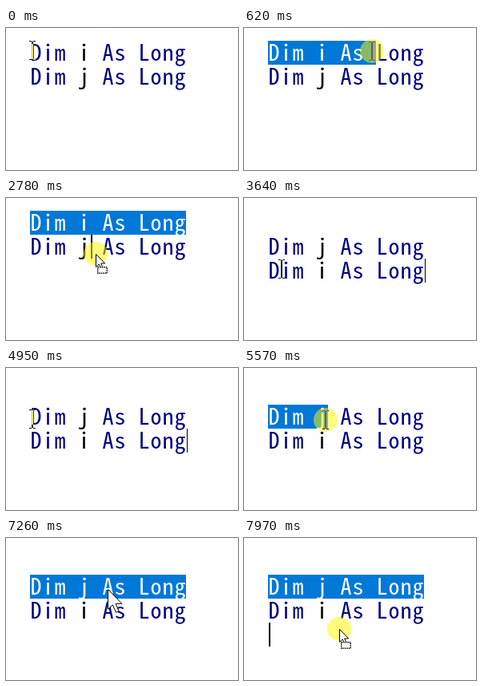
Animation, 290 px wide and 178 px high, one loop 8 s. Source, as an HTML page with a canvas:

```html
<!DOCTYPE html>
<html lang="en">
<head>
<meta charset="utf-8">
<title>Moving a line by drag and drop</title>
<style>
html, body { margin: 0; width: 100%; height: 100%; overflow: hidden; background: #fff; }
canvas { display: block; }
</style>
</head>
<body>
<canvas id="stage" width="290" height="178"></canvas>
<script>
const ctx = document.getElementById('stage').getContext('2d');
const LOOP = 8000, FRAME = 77, DROP = 3640;
const LEFT = 30, TOP = 16, CELL = 15, ROW = 30, LENGTH = 13;
const FONT = '28px "Noto Sans Mono CJK JP", "Noto Sans CJK JP", "Noto Sans CJK", monospace';

const linear = p => p;
const easeIn = power => p => p ** power;
const easeOut = power => p => 1 - (1 - p) ** power;

// Each move starts where the previous one ended.
const moves = [
  { start: 0, end: 0, mode: 'rest', x: 33, y: 28 },
  { start: 230, end: 1240, mode: 'select', x: 222, y: 31, easeX: easeOut(2.3) },
  { start: 1550, end: 2090, mode: 'hover', x: 118, y: 32, easeX: easeOut(2.3) },
  { start: 2470, end: 3160, mode: 'drag', x: 47, y: 89, easeX: easeIn(3), easeY: easeOut(1.9) },
  { start: DROP, end: DROP, mode: 'rest', x: 47, y: 89 },
  { start: 4570, end: 4950, mode: 'rest', x: 33, y: 64 },
  { start: 5350, end: 6630, mode: 'select', x: 225, y: 68, easeX: easeOut(2.3), easeY: easeOut(2.3) },
  { start: 6950, end: 7410, mode: 'hover', x: 119, y: 58, easeX: easeOut(2.3), easeY: easeIn(2) },
  { start: 7580, end: 7970, mode: 'drag', x: 119, y: 114 },
];

const rowTop = row => TOP + row * ROW;
const columnAt = x => Math.max(0, Math.min(LENGTH, Math.round((x - LEFT) / CELL)));

// The pointer advances in whole steps and changes shape with the first one.
function pointerAt(t) {
  const index = moves.findLastIndex(move => move.start <= t);
  const move = moves[index];
  const from = moves[index - 1] || move;
  const { start, end, mode, easeX = linear, easeY = linear } = move;
  const steps = Math.round((end - start) / FRAME);
  const p = steps ? Math.min(1, Math.floor((t - start) / (end - start) * steps + .1) / steps) : 1;
  return {
    x: Math.round(from.x + (move.x - from.x) * easeX(p)),
    y: Math.round(from.y + (move.y - from.y) * easeY(p)),
    mode,
    shape: p > 0 ? mode : from.mode,
  };
}

function drawLine(name, row, selected) {
  ctx.fillStyle = '#0078d7';
  ctx.fillRect(LEFT, rowTop(row), selected * CELL, ROW);
  ctx.font = FONT;
  ctx.textAlign = 'center';
  [...`Dim ${name} As Long`].forEach((char, i) => {
    ctx.fillStyle = i < selected ? '#fff' : i === 4 ? '#000' : '#000080';
    ctx.fillText(char, LEFT + (i + .5) * CELL, rowTop(row) + 25);
  });
}

function drawCaret(column, row, width) {
  ctx.fillStyle = '#000';
  ctx.fillRect(LEFT + column * CELL + 1, rowTop(row), width, ROW);
}

// The text pointer inverts whatever lies below it.
function drawBeam(x, y) {
  ctx.globalCompositeOperation = 'difference';
  ctx.fillStyle = '#fff';
  ctx.fillRect(x - 1, y - 11, 2, 22);
  for (const edge of [y - 12, y + 11]) {
    ctx.fillRect(x - 4, edge, 3, 1);
    ctx.fillRect(x + 1, edge, 3, 1);
  }
  ctx.globalCompositeOperation = 'source-over';
}

function drawArrow(x, y, scale) {
  const outline = [[0, 0], [0, 16], [3.7, 12.5], [6.5, 18.5], [8.8, 17.5], [6.2, 11.5], [11.2, 11.5]];
  ctx.beginPath();
  outline.forEach(([dx, dy]) => ctx.lineTo(x + .5 + dx * scale, y + .5 + dy * scale));
  ctx.closePath();
  ctx.fillStyle = '#fff';
  ctx.fill();
  ctx.strokeStyle = '#000';
  ctx.lineWidth = 1;
  ctx.stroke();
}

function drawDragBox(x, y) {
  ctx.fillStyle = '#fff';
  ctx.fillRect(x, y, 13, 9);
  ctx.strokeStyle = '#000';
  ctx.lineWidth = 1.5;
  ctx.setLineDash([1.5, 1]);
  ctx.strokeRect(x + .75, y + .75, 11.5, 7.5);
  ctx.setLineDash([]);
}

function drawHighlight(x, y) {
  ctx.fillStyle = 'rgba(255, 250, 0, .52)';
  ctx.beginPath();
  ctx.arc(x, y, 15, 0, 2 * Math.PI);
  ctx.fill();
}

function draw(t) {
  const { x, y, mode, shape } = pointerAt(t);
  const shift = t >= DROP ? 1 : 0;
  const names = shift ? ['j', 'i'] : ['i', 'j'];
  const selected = mode === 'rest' ? 0 : mode === 'select' ? columnAt(x) : LENGTH;

  ctx.fillStyle = '#fff';
  ctx.fillRect(0, 0, 290, 178);
  names.forEach((name, i) => drawLine(name, i + shift, i === 0 ? selected : 0));

  const blinkOn = t < 4110 || (t >= 4570 && t < 5150);
  if (shift && mode === 'rest' && blinkOn) drawCaret(LENGTH, 2, 1);
  if (shape === 'drag') {
    const row = Math.floor((y - TOP) / ROW);
    drawCaret(row < names.length + shift ? columnAt(x) : 0, row, 2);
  }

  if (mode === 'select' || mode === 'drag') drawHighlight(x, y);
  if (shape === 'hover') drawArrow(x, y, 1.55);
  else if (shape === 'drag') {
    drawArrow(x, y, 1);
    drawDragBox(x + 2, y + 16);
  } else drawBeam(x, y);
}

function tick() {
  draw(performance.now() % LOOP);
  requestAnimationFrame(tick);
}
tick();
</script>
</body>
</html>
```
